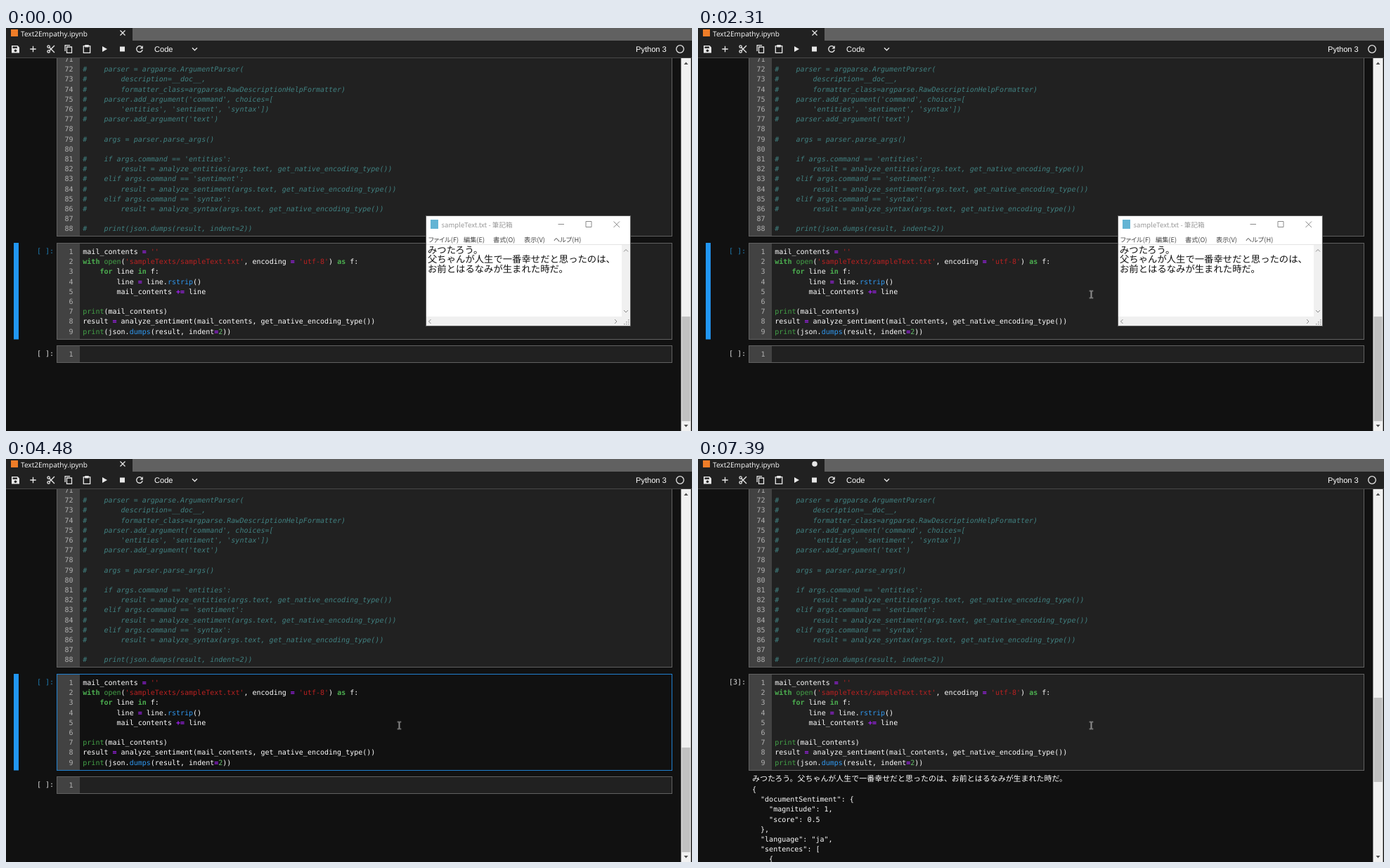
An HTML page for the animation above (8000 ms loop, 976 by 574 pixels).

```html
<!DOCTYPE html>
<html lang="ja">
<head>
<meta charset="utf-8">
<title>Notebook</title>
<style>
  html, body { margin: 0; width: 100%; height: 100%; overflow: hidden; background: #111; }
  svg { display: block; width: 976px; height: 574px; }
  text { white-space: pre; fill: #fff; text-rendering: geometricPrecision; }
  .mono { font: 10.03px "DejaVu Sans Mono", monospace; }
  .num { fill: #b0b0b0; }
  .comment { fill: #408080; font-style: italic; }
  .string { fill: #ba2121; }
  .keyword { fill: #4caf50; font-weight: bold; }
  .builtin { fill: #43a047; }
  .prop { fill: #2f97ee; }
  .op { fill: #aa22ff; font-weight: bold; }
  .digit { fill: #66bb6a; }
  .tab { font: 10.1px "Open Sans", "Noto Sans", sans-serif; }
  .ui { font: 11.1px "Liberation Sans", Arial, sans-serif; }
  .jp { font-family: "Noto Sans CJK JP", "Noto Sans CJK", sans-serif; }
  .title { font-size: 9.6px; fill: #999; }
  .menu { font-size: 9.2px; fill: #444; font-feature-settings: "palt"; }
  .note { font-size: 13.35px; fill: #111; }
  .out { font-size: 10.97px; }
  .line { fill: none; stroke: #e8e8e8; stroke-width: 1.3; }
  .solid { fill: #e8e8e8; }
  .thin { fill: none; stroke: #8a8a8a; stroke-width: 1; }
</style>
</head>
<body>
<svg id="stage" viewBox="0 0 976 574"></svg>
<script>
const LOOP = 8000, PITCH = 14.2;
const CLICK = 2860, FOCUS = 2960, RUN = 4820, PRINTED = 5030, DONE = 7390;
const CELL = '#212121', BORDER = '#616161', ACTIVE = '#1f7fb5', IDLE = '#e0e0e0';

const NAME = 'みつたろう。';
const SPEECH = ['父ちゃんが人生で一番幸せだと思ったのは、', 'お前とはるなみが生まれた時だ。'];

const parserCode = `
#    parser = argparse.ArgumentParser(
#        description=__doc__,
#        formatter_class=argparse.RawDescriptionHelpFormatter)
#    parser.add_argument('command', choices=[
#        'entities', 'sentiment', 'syntax'])
#    parser.add_argument('text')

#    args = parser.parse_args()

#    if args.command == 'entities':
#        result = analyze_entities(args.text, get_native_encoding_type())
#    elif args.command == 'sentiment':
#        result = analyze_sentiment(args.text, get_native_encoding_type())
#    elif args.command == 'syntax':
#        result = analyze_syntax(args.text, get_native_encoding_type())

#    print(json.dumps(result, indent=2))`;

const mailCode = `mail_contents = ''
with open('sampleTexts/sampleText.txt', encoding = 'utf-8') as f:
    for line in f:
        line = line.rstrip()
        mail_contents += line

print(mail_contents)
result = analyze_sentiment(mail_contents, get_native_encoding_type())
print(json.dumps(result, indent=2))`;

const jsonOut = `{
  "documentSentiment": {
    "magnitude": 1,
    "score": 0.5
  },
  "language": "ja",
  "sentences": [
    {`;

// ---- markup helpers ----
const text = (x, y, cls, s, attrs = '') => `<text x="${x}" y="${y}" class="${cls}" ${attrs}>${s}</text>`;
const rect = (x, y, w, h, fill, attrs = '') =>
  `<rect x="${x}" y="${y}" width="${w}" height="${h}" fill="${fill}" ${attrs}/>`;
const path = (d, cls, attrs = '') => `<path d="${d}" class="${cls}" ${attrs}/>`;
const group = (id, body) => `<g id="${id}">${body}</g>`;
const at = (x, y, body) => `<g transform="translate(${x} ${y})">${body}</g>`;

const TOKENS = /(?<string>'[^']*')|\b(?<keyword>with|for|in|as)\b|\b(?<builtin>open|print)\b|(?<prop>rstrip|dumps)|(?<op>\+?=)|(?<digit>\d)/g;
const highlight = s => s.replace(TOKENS, (m, ...rest) => {
  const groups = rest.at(-1);
  const cls = Object.keys(groups).find(k => groups[k]);
  return `<tspan class="${cls}">${m}</tspan>`;
});

const rows = (src, x, y, draw) =>
  src.split('\n').map((s, i) => draw(s, i, x, Math.round(y + i * PITCH))).join('');

const listing = (src, y, first, format, cls = '') => rows(src, 109.3, y, (s, i, x, by) =>
  text(95.6, by, 'mono num', first + i, 'text-anchor="end"') + text(x, by, 'mono ' + cls, format(s)));

const cellBox = (y, h, attrs = '') =>
  rect(72.5, y + .5, 875, h, CELL, `stroke="${BORDER}" ${attrs}`) + rect(73, y + 1, 32, h - 1, '#424242');

const prompt = (id, y, s, fill) => text(44, y, 'mono', s, `id="${id}" style="fill:${fill}"`);

// ---- top bars ----
const icons = [
  [13.5, '<path class="solid" d="M-5.5-5h8.5l2.5 2.5v8h-11z"/>' + rect(-4, -3.6, 6.4, 2.4, CELL) +
    `<circle cy="2.2" r="1.8" fill="${CELL}"/>`],
  [38.5, path('M-4.2 0h8.4M0-4.2v8.4', 'line')],
  [64, '<circle class="line" cx="-3.4" cy="-3.4" r="1.7"/><circle class="line" cx="-3.4" cy="3.4" r="1.7"/>' +
    path('M-2.2-2.2L5 5M-2.2 2.2L5-5', 'line')],
  [89, path('M-2.5-3h7v8.4h-7zM-4.9 3v-8.4h7', 'line')],
  [115, path('M-4.7-4.3h9.4v9.6h-9.4z', 'line') + path('M-2.8-6h5.6v3.4h-5.6z', 'solid')],
  [140, path('M-3-4L4 0L-3 4z', 'solid')],
  [165.5, path('M-3.5-3.5h7v7h-7z', 'solid')],
  [190, path('M3-3.2A4.3 4.3 0 1 0 4.2 1', 'line') + path('M4.8-5v4.4H.4z', 'solid')],
  [268.5, path('M-3.5-1.7L0 1.8L3.5-1.7', 'line')]
];

const bars =
  rect(0, 0, 976, 43, CELL) + rect(180, 0, 796, 18, BORDER) + rect(0, 42, 976, 1, '#484848') +
  rect(7, 2, 10, 10, '#ef7d28') +
  text(21, 12, 'tab', 'Text2Empathy.ipynb') +
  path('M162.5 3.5l7 7M169.5 3.5l-7 7', 'line', 'id="close"') +
  '<circle id="dirty" class="solid" cx="166" cy="7" r="3.8"/>' +
  icons.map(([x, body]) => at(x, 30, body)).join('') +
  text(211, 34, 'ui', 'Code') + text(896, 34, 'ui', 'Python 3') +
  '<circle class="line" cx="959" cy="30" r="5.3"/><circle id="busy" class="solid" cx="959" cy="30" r="6"/>';

const scrollbar =
  rect(960.4, 43, 14.2, 531, '#f1f1f1') +
  rect(961.5, 411, 12, 149, '#c1c1c1', 'id="thumb"') +
  path('M964.5 52l3-3.4l3 3.4zM964.5 565l3 3.4l3-3.4z', '', 'fill="#505050"');

// ---- notebook ----
const notebook =
  cellBox(30, 266) + listing(parserCode, 48, 71, s => s, 'comment') +
  cellBox(306, 137, 'id="editor"') + listing(mailCode, 322, 1, highlight) +
  rect(284.5, 368, 1, 14, '#fff', 'id="caret"') +
  rect(11, 306, 7, 137.5, '#2196f3', 'id="bar"') +
  prompt('idle', 320.5, '[ ]:', ACTIVE) + prompt('running', 320.5, '[*]:', IDLE) +
  prompt('finished', 320.5, '[3]:', IDLE) +
  group('next',
    rect(11, 453, 7, 23.5, '#2196f3', 'id="nextBar"') + cellBox(452, 24) +
    text(95.6, 468, 'mono num', 1, 'text-anchor="end"') + prompt('nextPrompt', 467, '[ ]:', IDLE)) +
  group('printed', text(77, 459, 'jp out', NAME + SPEECH.join(''))) +
  group('json', rows(jsonOut, 77, 474, (s, i, x, y) => text(x, y, 'mono', s)));

// ---- text editor window ----
const menus = [[601, 'ファイル(F)'], [651, '編集(E)'], [693, '書式(O)'], [737, '表示(V)'], [779, 'ヘルプ(H)']];
const grip = [[886, 416], [886, 419], [886, 422], [883, 419], [883, 422], [880, 422]];
const notes = group('notes',
  rect(597, 267, 292, 158, '#fff') +
  rect(604, 273, 11, 13, '#63b4d4') +
  text(619.5, 283.5, 'jp title', 'sampleText.txt - 筆記箱') +
  path('M785.5 279.5h8.5M825 275.5h8v8h-8zM864.5 275.5l8.5 8.5M873 275.5l-8.5 8.5', 'thin') +
  menus.map(([x, s]) => text(x, 304.5, 'jp menu', s)).join('') +
  rect(597, 308, 292, 1, '#e4e4e4') +
  rect(876, 309, 13, 116, '#f0f0f0') + rect(597, 411, 292, 14, '#f0f0f0') +
  path('M879 318.5l3-3l3 3M879 402l3 3l3-3M604.5 415l-3 3l3 3M866 415l3 3l-3 3', 'thin') +
  grip.map(([x, y]) => rect(x - 1, y - 1, 1.6, 1.6, '#aaa')).join('') +
  [NAME, ...SPEECH].map((s, i) => text(600, Math.round(320.5 + i * 13.5), 'jp note', s)).join('') +
  rect(597.5, 267.5, 291, 157, 'none', 'stroke="#5a5a5a"'));

// ---- pointer, drawn around its hot spot ----
const pointer =
  '<circle id="halo" cx="558" cy="378.5" r="10" fill="#979010"/>' +
  group('pointer',
    path('M0 0v12.5l3-2.8l2 4.4l2-.9l-2-4.3h4z', '', 'id="arrow" fill="#fff" stroke="#000" stroke-width=".8"') +
    path('M-2.5-5h2M.5-5h2M0-4.5v9M-2.5 5h2M.5 5h2', '', 'id="beam" fill="none" stroke="#fff"'));

const stage = document.getElementById('stage');
stage.innerHTML = rect(0, 0, 976, 574, '#111') + notebook + bars + scrollbar + notes + pointer;

// ---- timing: each track is a list of [time, value] that holds until the next ----
function track(id, prop, steps) {
  const frames = steps.map(([t, v]) => ({ offset: t / LOOP, [prop]: v, easing: 'steps(1, end)' }));
  frames.push({ offset: 1, [prop]: steps.at(-1)[1] });
  document.getElementById(id).animate(frames, { duration: LOOP, iterations: Infinity });
}

// Visibility flips at each listed time.
const toggle = (id, on, ...times) =>
  track(id, 'opacity', [0, ...times].map((t, i) => [t, (i % 2 === 0) === on ? 1 : 0]));

toggle('notes', true, CLICK);
toggle('halo', false, CLICK, 3010);
toggle('caret', false, FOCUS, 3390, 3930, 4480);
track('editor', 'stroke', [[0, BORDER], [FOCUS, '#2080cf'], [RUN, BORDER]]);
track('editor', 'fill', [[0, CELL], [FOCUS, '#111111'], [RUN, CELL]]);

toggle('bar', true, RUN);
toggle('idle', true, RUN);
toggle('running', false, RUN, DONE);
toggle('finished', false, DONE);
toggle('close', true, RUN);
toggle('dirty', false, RUN);
toggle('busy', false, RUN, DONE);
toggle('nextBar', false, RUN);
track('nextPrompt', 'fill', [[0, IDLE], [RUN, ACTIVE]]);
track('next', 'transform', [[0, 'translate(0px, 0px)'], [PRINTED, 'translate(0px, 21px)']]);
toggle('next', true, DONE);
toggle('printed', false, PRINTED);
toggle('json', false, DONE);
track('thumb', 'y', [[0, '411px'], [PRINTED, '406px'], [DONE, '340px']]);
track('thumb', 'height', [[0, '149px'], [PRINTED, '148px'], [DONE, '120px']]);

// The pointer slides in with an ease-out, sampled at eleven moments.
const move = (x, y) => `translate(${x}px, ${y}px)`;
const slide = Array.from({ length: 11 }, (_, i) => {
  const left = (1 - i / 10) ** 2;
  return { t: i ? 1451 + 78 * i : 1440, x: Math.round(559 + 168 * left) + .5, y: Math.round(380 + 189 * left) + .5 };
});
const overText = y => y < 443 || (y > 453 && y < 476);
track('pointer', 'transform', [[0, move(727, 569)], ...slide.map(p => [p.t, move(p.x, p.y)]),
  [2310, move(559.5, 379.5)], [CLICK, move(559, 379)], [3270, move(559.5, 379.5)]]);
track('arrow', 'opacity', [[0, 0], ...slide.map(p => [p.t, overText(p.y) ? 0 : 1])]);
track('beam', 'opacity', [[0, 0], ...slide.map(p => [p.t, overText(p.y) ? 1 : 0])]);
</script>
</body>
</html>
```
